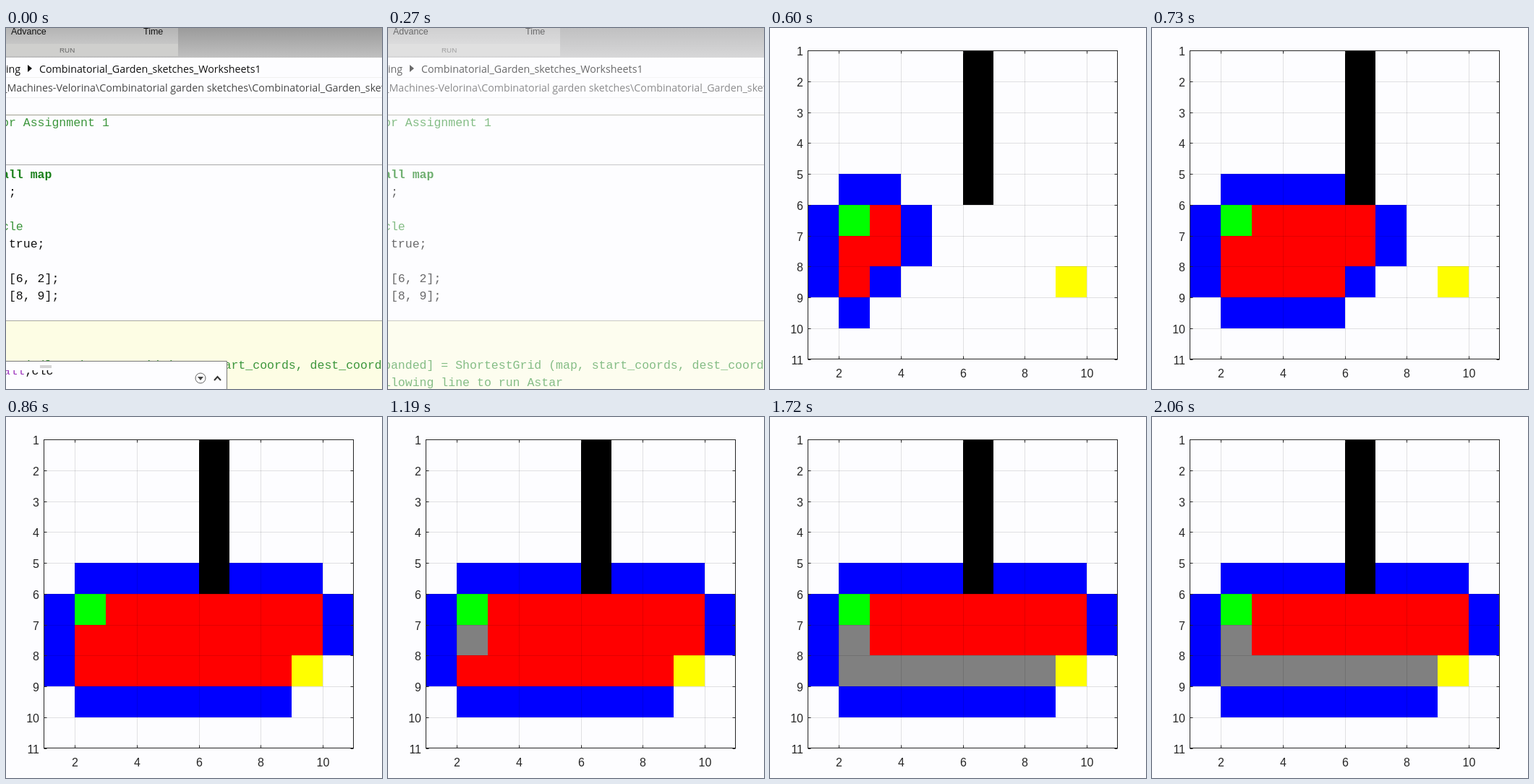
Animation of 520 by 500 pixels, one loop 2450 ms. Source, as an HTML page with a canvas:

```html
<!DOCTYPE html>
<html lang="en">
<head>
<meta charset="utf-8">
<title>Grid search</title>
<style>
  html, body { margin: 0; overflow: hidden; background: #fdfdff; }
  canvas { display: block; }
</style>
</head>
<body>
<canvas id="stage" width="520" height="500"></canvas>
<script>
const ctx = document.getElementById('stage').getContext('2d');
const LOOP = 2450;
const SANS = '"Liberation Sans", sans-serif';
const UI = '14.25px "Open Sans", sans-serif';
const CODE = '16.55px "Liberation Mono", monospace';
const PAPER = '#fdfdff';
const INK = '#111';
const AXIS = '#262626';
const GRID = '#e2e2e2';

function rect(color, x, y, w, h) {
  ctx.fillStyle = color;
  ctx.fillRect(x, y, w, h);
}

function text(str, x, y, font, color, align = 'left') {
  ctx.font = font;
  ctx.fillStyle = color;
  ctx.textAlign = align;
  ctx.fillText(str, x, y);
}

function trace(points) {
  ctx.beginPath();
  for (const [x, y] of points) ctx.lineTo(x, y);
}

function line(color, ...points) {
  ctx.strokeStyle = color;
  trace(points);
  ctx.stroke();
}

function triangle(color, ...points) {
  ctx.fillStyle = color;
  trace(points);
  ctx.fill();
}

function fadeDown(top, bottom, height) {
  const shade = ctx.createLinearGradient(0, 0, 0, height);
  shade.addColorStop(0, top);
  shade.addColorStop(1, bottom);
  return shade;
}

// ---- Editor window ----
const GREEN = '#3c963c';
const codeLines = [
  ['or Assignment 1', 136, GREEN],
  ['all map', 208, '#1a801a', 'bold '],
  [' ;', 232, INK],
  ['cle', 280, GREEN],
  [' true;', 304, INK],
  [' [6, 2];', 352, INK],
  [' [8, 9];', 376, INK],
  ['panded] = ShortestGrid (map, start_coords, dest_coords', 472, GREEN],
  ['llowing line to run Astar', 496, GREEN]
];

function drawToolbar() {
  rect(fadeDown('#9b9b9b', '#c0c0c0', 41), 0, 0, 520, 41);
  rect(fadeDown('#b4b4b4', '#c6c6c6', 22), 0, 0, 238, 22);
  rect('#cfcfcd', 0, 22, 238, 17);
  text('Advance', 7, 9, '12.5px ' + SANS, INK);
  text('Time', 190, 9, '12.5px ' + SANS, INK);
  text('RUN', 74, 34, '9.8px ' + SANS, '#666');
}

function drawPanel() {
  rect(PAPER, 0, 461, 305, 39);
  line('#777', [0, 461.5], [305.5, 461.5], [305.5, 500]);
  text('all', -4, 480, CODE, '#a03cc0');
  text(';clc', 25.7, 480, CODE, INK);
  rect(PAPER, 0, 463, 80, 11);
  rect('#d4d4d4', 47, 467, 16, 4);
  ctx.strokeStyle = '#666';
  ctx.beginPath();
  ctx.arc(269, 485, 7, 0, 7);
  ctx.stroke();
  triangle('#444', [265, 483], [273, 483], [269, 488]);
  ctx.lineWidth = 2;
  line('#333', [288, 488], [292.5, 483], [297, 488]);
  ctx.lineWidth = 1;
}

function drawEditor(fade, panelOpen) {
  rect(PAPER, 0, 0, 520, 500);
  drawToolbar();
  rect('#fdfde4', 0, 405, 520, 95);
  line('#f0f0f0', [0, 68.5], [520, 68.5]);
  line('#f0f0f0', [0, 96.5], [520, 96.5]);
  line('#a0a090', [0, 120.5], [520, 120.5]);
  line('#a8a8a8', [0, 189.5], [520, 189.5]);
  line('#a8a8a0', [0, 405.5], [520, 405.5]);
  text('ing', 0, 62, UI, INK);
  triangle(INK, [30, 51], [36, 56], [30, 61]);
  text('Combinatorial_Garden_sketches_Worksheets1', 46, 62, UI, INK);
  text('_Machines-Velorina\\Combinatorial garden sketches\\Combinatorial_Garden_sketches',
    -5, 88, UI, '#484848');
  for (const [str, y, color, weight = ''] of codeLines) text(str, -6, y, weight + CODE, color);
  if (panelOpen) drawPanel();
  ctx.globalAlpha = fade;
  rect(PAPER, 0, 0, 520, 500);
  ctx.globalAlpha = 1;
}

// ---- Search plot ----
const gx = col => Math.round(52.5 + 42.8 * (col - 1));
const gy = row => Math.round(31.2 + 42.75 * (row - 1));
const START = [2, 6], GOAL = [9, 8];

// Cells are expanded column by column, top to bottom.
const expanded = [[2, 7], [2, 8]];
for (let col = 3; col <= 9; col++)
  for (let row = 6; row <= 8; row++)
    if (col < 9 || row < 8) expanded.push([col, row]);

const route = [[2, 7]];
for (let col = 2; col <= 8; col++) route.push([col, 8]);

function cell(color, [col, row], rows = 1) {
  const x = gx(col), y = gy(row);
  rect(color, x, y, gx(col + 1) - x, gy(row + rows) - y);
}

function drawAxes() {
  const left = 52.5, right = 480.5, top = 31.5, bottom = 458.5;
  ctx.globalCompositeOperation = 'multiply';
  for (let k = 2; k <= 10; k++) {
    const x = gx(k) + 0.5, y = gy(k) + 0.5;
    if (k % 2 === 0) line(GRID, [x, top], [x, bottom]);
    line(GRID, [left, y], [right, y]);
  }
  ctx.globalCompositeOperation = 'source-over';
  ctx.strokeStyle = AXIS;
  ctx.strokeRect(left, top, right - left, bottom - top);
  for (let k = 1; k <= 11; k++) {
    const x = gx(k) + 0.5, y = gy(k) + 0.5;
    line(AXIS, [left, y], [left + 4, y]);
    line(AXIS, [right, y], [right - 4, y]);
    text(k, 46, y + 6, '16px ' + SANS, AXIS, 'right');
    if (k % 2) continue;
    line(AXIS, [x, top], [x, top + 4]);
    line(AXIS, [x, bottom], [x, bottom - 4]);
    text(k, x, 484, '16px ' + SANS, AXIS, 'center');
  }
}

function drawPlot(visitedCount, routeCount) {
  rect(PAPER, 0, 0, 520, 500);
  const visited = expanded.slice(0, visitedCount);
  for (const [c, r] of [START, ...visited])
    for (const near of [[c - 1, r], [c + 1, r], [c, r - 1], [c, r + 1]]) cell('#00f', near);
  for (const pos of visited) cell('#f00', pos);
  for (const pos of route.slice(0, routeCount)) cell('#808080', pos);
  cell('#000', [6, 1], 5);
  cell('#0f0', START);
  cell('#ff0', GOAL);
  drawAxes();
}

function frame(now) {
  const step = Math.floor((now % LOOP - 127) / 66.25);
  if (step < 7) drawEditor(Math.max(0, (step + 1) / 8), step < 0);
  else drawPlot(Math.floor(4 + 4.5 * (step - 7)), Math.max(0, step - 15));
  requestAnimationFrame(frame);
}
requestAnimationFrame(frame);
</script>
</body>
</html>
```
